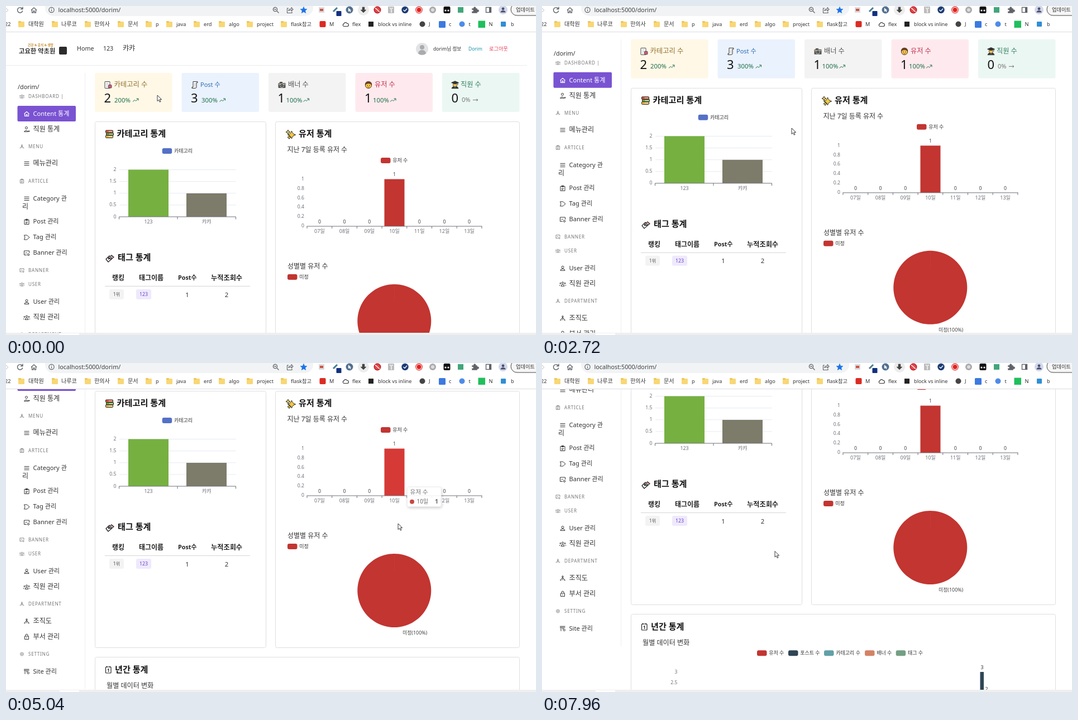
Write an HTML page that moves like this. It is 949 by 590 pixels and loops after 8 s.

```html
<!DOCTYPE html>
<html lang="ko">
<head>
<meta charset="utf-8">
<title>Dashboard</title>
<style>
html,body{margin:0;width:100%;height:100%;overflow:hidden;background:#fff}
svg{display:block;width:100%;height:100%}
text{font-family:'Noto Sans','Noto Sans CJK KR',sans-serif;white-space:pre}
</style>
</head>
<body>
<svg id="stage" viewBox="0 0 949 590"></svg>
<script>
const LOOP = 8000, STEP = 40;

// ---- drawing helpers (text y is the middle of the line)
const text = (x, y, s, size, fill = '#333', more = '') =>
  `<text x="${x}" y="${y + size * .36}" font-size="${size}" fill="${fill}" ${more}>${s}</text>`;
const mid = (x, y, s, size, fill, more = '') => text(x, y, s, size, fill, 'text-anchor="middle" ' + more);
const end = (x, y, s, size, fill) => text(x, y, s, size, fill, 'text-anchor="end"');
const rect = (x, y, w, h, fill, r = 0, more = '') =>
  `<rect x="${x}" y="${y}" width="${w}" height="${h}" rx="${r}" fill="${fill}" ${more}/>`;
const dot = (x, y, r, fill, more = '') => `<circle cx="${x}" cy="${y}" r="${r}" fill="${fill}" ${more}/>`;
const path = (d, stroke = '#333', w = 1, fill = 'none') =>
  `<path d="${d}" stroke="${stroke}" stroke-width="${w}" fill="${fill}" stroke-linejoin="round"/>`;
const at = (x, y, s, more = '') => `<g transform="translate(${x} ${y})" ${more}>${s}</g>`;
const bold = 'font-weight="700"';

// ---- browser bar
function browser() {
  const grey = '#5f6368';
  let s = rect(0, 0, 949, 47, '#fff') + rect(70, -12, 480, 30, '#f1f3f4', 15);
  s += path('M0 4L4 7.5 0 11', '#bbb');
  s += path('M29 4.5a4.7 4.7 0 1 0 .8 4M30 1.5V5.5H26', grey, 1.4);
  s += path('M45 7.5L50 3 55 7.5M46.5 6.5V12H49V9H51V12H53.5V6.5', grey, 1.3);
  s += dot(81.5, 7, 4.6, 'none', `stroke="${grey}" stroke-width="1.2"`) + path('M81.5 6.5V9.5M81.5 4.2V5.2', grey, 1.2);
  s += text(93.5, 7, 'localhost:5000/dorim/', 10.8, '#3c4043');
  s += dot(482, 6, 3.6, 'none', `stroke="${grey}" stroke-width="1.3"`) + path('M485 9L488.5 12.5M480.3 6H483.7', grey, 1.3);
  s += path('M506 4H503.5V12.5H512V10M506 9C506 6 508 5 511 5V2.5L514 6 511 9V7C509 7 507 7.5 506 9', grey, 1.1);
  s += path('M533 1.2L534.7 5.2 539 5.6 535.8 8.5 536.8 12.8 533 10.5 529.2 12.8 530.2 8.5 527 5.6 531.3 5.2Z', '#1a73e8', .5, '#1a73e8');
  // extensions
  s += rect(560, 2, 10, 10, '#d9dadd', 1) + rect(562, 5, 6, 4, '#d0523f');
  s += path('M586 10L593 3', '#4c7d92', 3) + rect(591.5, 9, 9, 9, '#12307f', 1);
  s += dot(615, 7, 6.5, '#53708f') + path('M613 3.5V10L615 8.5 616.5 11 617.4 10.3 616 8H618Z', '#fff', .3, '#fff');
  s += dot(640, 7, 10, '#ececec') + path('M638 2H642V7H645L640 12 635 7H638Z', '#444', .5, '#444');
  s += dot(665, 7, 5.7, '#e04848', 'stroke="#c21f2b" stroke-width="1.6"') + path('M661 3.5L669 10.5', '#fff', 1.3);
  s += rect(684, 1, 11, 12, '#bcbcbc', 1) + path('M687 3L690 6V12M690 4H693', '#f4f4f4', 1.6);
  s += dot(714.5, 7, 6.2, '#1c3c73') + path('M711.5 7L714 9.3 718 4.8', '#fff', 1.4);
  s += dot(739.5, 7, 5.8, '#fff', 'stroke="#d9302c" stroke-width="1.2"') + dot(739.5, 7, 4, '#e3211d');
  s += dot(764, 7, 6, '#aaa') + dot(764, 7, 3, '#ddd');
  s += rect(783.5, 1, 12, 12, '#111', 2) + dot(787, 8, 1.6, '#fff') + dot(792, 8, 1.6, '#fff');
  s += rect(809, 2, 10, 10, '#41a67a');
  s += path('M834.5 4.5H837.5a2 2 0 1 1 3.6 0H843.5V7a2 2 0 1 1 0 3.2V12.5H834.5V9.5a1.6 1.6 0 1 0 0-2.5Z', grey, .5, grey);
  s += rect(859.5, 2.5, 9, 9, 'none', 0, `stroke="${grey}" stroke-width="1.4"`) + rect(865, 2, 4, 10, grey);
  s += dot(890, 7, 8, '#d3d7ea') + dot(890, 5, 2.4, '#4b5170') + path('M885.5 11.5a4.5 3.6 0 0 1 9 0Z', 'none', 0, '#4b5170');
  s += rect(904, -5, 70, 22, '#f6f6f6', 11, 'stroke="#444" stroke-width="1"') + text(913, 7, '업데이트', 9.2);
  // bookmarks
  const y = 32.5;
  s += end(8.5, y, '22', 9.2);
  [[22, 40, '대학원'], [82, 99, '나루코'], [141, 158, '한의사'], [200, 218, '문서'], [250, 268, 'p'], [287, 305, 'java'],
   [336, 354, 'erd'], [381, 399, 'algo'], [431, 449, 'project'], [492, 510, 'flask참고']].forEach(([fx, x, name]) => {
    s += rect(fx, 28, 11, 10, '#f8d775', 1.2) + rect(fx, 27, 5, 3, '#eec65a', 1) + text(x, y, name, /^[가-힣]/.test(name) ? 10.1 : 9.2);
  });
  [[579, 'M'], [620, 'flex'], [666, 'block vs inline'], [757, 'J'], [793, 'c'], [828.5, 't'], [864.5, 'N'], [904, 'b']]
    .forEach(([x, name]) => s += text(x, y, name, 9.2));
  s += rect(561.5, 27, 11, 11, '#dd2b22', 2) + rect(649, 28, 9, 9, '#222') + dot(745.5, 32.5, 5, '#444');
  s += path('M605 36.5a2.4 2.4 0 0 1 0-4.6 3 3 0 0 1 5.6-.6 2.6 2.6 0 0 1 .4 5.2Z', '#333', 1.1);
  s += rect(775, 27, 12, 12, '#3b7ae0', 1.5) + dot(816.5, 32.5, 5, '#4f8bea') + rect(845.5, 26.5, 12.5, 12.5, '#1fbf5c') + rect(886, 28, 9, 9, '#2f8fd6', 1);
  return s + rect(0, 46, 949, 1, '#dadce0');
}

// ---- page header and sidebar
function header() {
  return text(39, 70, '건강 &amp; 휴식 &amp; 생활', 5.7, '#c98a2b', bold) +
    text(23, 80.5, '고요한 약초원', 11.3, '#333', bold) + rect(95, 73, 14, 14, '#2b2b2b', 2) +
    text(127, 76.5, 'Home', 10.7) + text(174, 76.5, '123', 10.6) + text(209, 76, '캬캬', 12) +
    dot(745, 77, 11, '#e1e3e5') + dot(745, 74, 4, '#a9abad') + path('M738 85.3a7 6.6 0 0 1 14 0 11 11 0 0 1-14 0Z', 'none', 0, '#a9abad') +
    text(765, 77, 'dorim님 정보', 8.6) + text(828, 77, 'Dorim', 8.5, '#1793a6') + text(865, 76.5, '로그아웃', 9.2, '#e8415a') +
    rect(0, 106, 933, 1, '#ebebeb');
}

const ICON = {
  home: 'M-4.5 0L0-4 4.5 0M-3.5-.8V4H3.5V-.8M-1 4V1H1V4',
  lines: 'M-4.5-3H4.5M-4.5 0H4.5M-4.5 3H4.5',
  note: 'M-4-3.5H4V4.5H-4ZM-1.5-4.8H1.5V-2.5H-1.5ZM-2 .5H2M-2 2.5H1',
  tag: 'M-4.5-4H0.5L5 0 .5 4H-4.5L-3 0Z',
  image: 'M4.5 0V-4H-4.5V3.5H0M-2.5 1L-.5-1 1 .5M1.5 3a1.6 1.6 0 1 0 3.2 0 1.6 1.6 0 1 0-3.2 0',
  user: 'M-2-2a2 2 0 1 0 4 0 2 2 0 1 0-4 0M-4 4a4 3 0 0 1 8 0Z',
  users: 'M-1.5-2a1.5 1.5 0 1 0 3 0 1.5 1.5 0 1 0-3 0M-3 4a3 3 0 0 1 6 0ZM-5-1a1 1 0 1 0 2 0 1 1 0 1 0-2 0M3-1a1 1 0 1 0 2 0 1 1 0 1 0-2 0M-5.5 3.5V2M5.5 3.5V2',
  tree: 'M-1.2-3a1.2 1.2 0 1 0 2.4 0 1.2 1.2 0 1 0-2.4 0M0-1.8L-3.5 3M0-1.8L3.5 3M-4.8 3.5H-2.4M2.4 3.5H4.8M0-1V3.5',
  lock: 'M-3.5-1H3.5V4.5H-3.5ZM-2-1V-2.8a2 2 0 0 1 4 0V-1M0 1V2.6',
  site: 'M-5-4H4.5M-5-2H4.5M-3-1.5V4.5M-1 0H2M1 2.5a1.7 1.7 0 1 0 3.4 0 1.7 1.7 0 1 0-3.4 0',
  staff: 'M-2.5-2.5a2 2 0 1 0 4 0 2 2 0 1 0-4 0M-4.5 4.5a4 4.5 0 0 1 7 0ZM2.5 3.5H5.5M4 2V5',
  gear: 'M-1.2 0a1.2 1.2 0 1 0 2.4 0 1.2 1.2 0 1 0-2.4 0M0-4L3.4-2V2L0 4-3.4 2V-2Z'
};

function sidebar() {
  const icon = (x, y, name, color = '#333', w = 1, scale = 1) =>
    at(x, y, at(0, 0, path(ICON[name], color, w)).replace('translate(0 0)', `scale(${scale})`));
  let s = rect(141, 120, 1, 622, '#efefef') + text(21, 145, '/dorim/', 10.8);
  [[162, 'DASHBOARD |', 'users'], [252, 'MENU', 'tree'], [314, 'ARTICLE', 'note'], [474, 'BANNER', 'image'],
   [499, 'USER', 'users'], [589, 'DEPARTMENT', 'tree'], [679, 'SETTING', 'gear']].forEach(([y, name, ic]) => {
    s += icon(28.5, y, ic, '#777', 1.1, .78) + text(40, y, name, 8.1, '#777', 'letter-spacing=".75"');
  });
  s += rect(20.5, 179, 104.5, 28, '#7953d2', 2) + icon(37, 193.5, 'home', '#fff', 1.1) + text(48.5, 193, 'Content 통계', 11.1, '#fff');
  [[220.5, '직원 통계', 'staff'], [282, '메뉴관리', 'lines'], [345, 'Category 관', 'lines'], [386.5, 'Post 관리', 'note'],
   [414.5, 'Tag 관리', 'tag'], [442.5, 'Banner 관리', 'image'], [530, 'User 관리', 'user'], [558, '직원 관리', 'users'],
   [619.5, '조직도', 'tree'], [647.5, '부서 관리', 'lock'], [709.8, 'Site 관리', 'site']].forEach(([y, name, ic]) => {
    s += icon(37, y + .5, ic) + text(48.5, y, name, /^[A-Z]/.test(name) ? 11.1 : 12.1);
  });
  return s + text(29, 359.5, '리', 12);
}

// ---- summary cards
const emoji = {
  tabs: rect(-5.5, -6, 9, 12, '#fff', .5, 'stroke="#444" stroke-width="1"') + path('M-3-3H1M-3 0H1M-3 3H0', '#999', .8) + rect(1, 0, 5.5, 5.5, '#d9587d', 1, 'stroke="#333" stroke-width=".8"'),
  scroll: path('M-3-6H5V-4H3V4.5Q3 6-1 6H-5V4H-3Z', '#333', 1, '#fff') + path('M-1-2.5H1.5M-1 0H1.5M-1 2.5H1.5', '#888', .7),
  camera: rect(-6.5, -3.5, 13, 9, '#555', 1.2) + rect(-4, -5.5, 5, 3, '#555') + rect(-5.8, -2.5, 11.6, 2, '#c9a36a') + dot(0, 1.2, 3.2, '#222', 'stroke="#ddd" stroke-width="1"') + dot(0, 1.2, 1.2, '#6cb4d8'),
  face: dot(0, .5, 5.6, '#fbc94d', 'stroke="#4a3420" stroke-width="1"') + path('M-5.8 0Q-6-6 0-6.3 6-6 5.8 0 4-2.5 0-2.8-4-2.5-5.8 0Z', '#3b2416', .6, '#6b3f1f') + dot(-2, 1, .8, '#333') + dot(2, 1, .8, '#333') + path('M-2 3.4Q0 4.8 2 3.4', '#7a3d1c', .8),
  student: path('M-6 6.5Q-5.5 2.5 0 2.5 5.5 2.5 6 6.5Z', '#222', .5, '#333') + dot(0, 0, 3.6, '#f5c14d', 'stroke="#332" stroke-width=".8"') + path('M-6.5-4L0-6.8 6.5-4 0-1.6ZM5-4V0', '#222', .8, '#333') + path('M-1 3.5L0 6 1 3.5Z', 'none', 0, '#3b8bc4')
};
const CARDS = [
  { x: 159, bg: '#fff8e7', ink: '#94702c', icon: 'tabs', name: '카테고리 수', n: 2, pct: '200%', px: 35, ix: 68, sel: [193, 63], size: 12.3, nx: 193.5 },
  { x: 314.5, bg: '#eaf2fd', ink: '#2c6cb3', icon: 'scroll', name: 'Post 수', n: 3, pct: '300%', px: 35.5, ix: 68, sel: [332, 54.5], size: 11, nx: 348 },
  { x: 470, bg: '#f3f3f3', ink: '#555', icon: 'camera', name: '배너 수', n: 1, pct: '100%', px: 31.5, ix: 62.5, sel: [487, 58], size: 12.2, nx: 505 },
  { x: 625.5, bg: '#feeaee', ink: '#c4304f', icon: 'face', name: '유저 수', n: 1, pct: '100%', px: 31.5, ix: 62.5, sel: [642, 58], size: 12.2, nx: 660 },
  { x: 781, bg: '#ebf7f3', ink: '#33805f', icon: 'student', name: '직원 수', n: 0, pct: '0%', px: 35, ix: 55, sel: [798, 53], size: 12.2, nx: 814 }
];
const inkOf = (c, part) => part === 'name' ? c.ink : part === 'num' ? '#111' : c.n ? '#1d6e49' : '#777';

function cards() {
  return CARDS.map((c, i) => {
    const mark = (part, x, y, w, h) => rect(x, y, w, h, '#3390ff', 0, `id="${part}Mark${i}" visibility="hidden"`);
    const pctEnd = c.x + c.ix - 2;
    return rect(c.x, 120, 138.5, 70, c.bg, 3) +
      mark('name', c.sel[0], 133, c.sel[1], 16) + mark('num', c.x + 17, 150.5, c.px - 20, 27.5) +
      mark('pct', c.x + c.px - 3, 150.5, pctEnd - c.x - c.px + 3, 27.5) +
      at(c.x + (i === 4 ? 23 : i === 2 ? 24 : 23.5), 141.5, emoji[c.icon]) +
      text(c.nx, 141, c.name, c.size, c.ink, `id="name${i}"`) +
      text(c.x + 16.5, 165, c.n, 22, '#111', `id="num${i}"`) +
      text(c.x + c.px, 168.5, c.pct, c.n ? 11.3 : 11, inkOf(c, 'pct'), `id="pct${i}"`) +
      at(c.x + c.ix, 168.5, c.n ? path('M0 3L3.5 0 5.5 2 9.5-2M6.5-2.5H10V1', '#1d6e49', 1) : path('M0 0H9M6.5-2L9 0 6.5 2', '#777', 1));
  }).join('');
}

// ---- panels and charts
const swatch = (x, y, color, name, more = '') => rect(x, y - 5, 17.5, 10, color, 3, more) + text(x + 21.2, y - .5, name, 9);
const panel = (x, y, w, h) => rect(x, y, w, h, '#fff', 3, 'stroke="#dedede"');
const AX = '#6e7079';

function leftPanel() {
  let s = panel(159.5, 207.5, 306, 460);
  s += at(185.5, 230, rect(-7, -7, 13, 4.5, '#d8533c', 1, 'stroke="#222"') + rect(-6, -2.5, 13, 4.5, '#5e9e42', 1, 'stroke="#222"') + rect(-7, 2, 13, 4.5, '#e9b44a', 1, 'stroke="#222"') + path('M-2-5H5M-1-.2H6M-2 4.2H5', '#fff', 1));
  s += text(198.5, 229, '카테고리 통계', 15.2, '#111', bold) + swatch(279.7, 260, '#5470c6', '카테고리');
  for (let i = 0; i < 5; i++) {
    const y = 378 - i * 21.1;
    if (i) s += rect(203, y - .5, 209, 1, '#e6eaf2');
    s += end(197.5, y - .5, i / 2, 8.6, AX);
  }
  s += rect(219, 293.5, 72, 84.5, '#76b041', 0, 'id="bar0"') + rect(323, 336, 72, 42, '#7d7b6a', 0, 'id="bar1"');
  s += path('M202.5 382.5V378H411.5V382.5M307 378V382.5', AX) + mid(255, 386.5, '123', 8.8, AX) + mid(359, 386.5, '캬캬', 9, AX);
  // tag table
  s += at(186, 452, path('M-3 0L3-5 7-1.5 2 2ZM-7 2L-1-4 4 1-3 7Z', '#222', 1.3, '#fff') + path('M-3 2L1 0', '#222', 1.5) + dot(4, -3, 1.2, '#c33'), '');
  s += text(200, 451, '태그 통계', 15.1, '#111', bold);
  [[190, '랭킹', 12], [238, '태그이름', 12], [308, 'Post수', 10.8], [367, '누적조회수', 12.2]].forEach(([x, n, z]) => s += text(x, 487.5, n, z, '#222', bold));
  s += rect(177, 502, 260, 1, '#d5d5d5') + rect(185, 508, 26, 18, '#f3f3f3', 3) + rect(233, 508, 27, 18, '#efe9fd', 3);
  return s + mid(198, 517, '1위', 8.4, '#555') + mid(246.5, 517, '123', 8.8, '#6944c6') + mid(324.5, 517.5, '1', 11.3) + mid(395, 517.5, '2', 11.3);
}

function rightPanel() {
  let s = panel(482.5, 207.5, 437, 460);
  const star = (x, y, r) => path(`M${x} ${y - r}Q${x + r * .2} ${y - r * .2} ${x + r} ${y} ${x + r * .2} ${y + r * .2} ${x} ${y + r} ${x - r * .2} ${y + r * .2} ${x - r} ${y} ${x - r * .2} ${y - r * .2} ${x} ${y - r}Z`, '#222', 1, '#f6c83b');
  s += star(511.5, 231, 7) + star(505, 226, 3.8) + star(507, 235.5, 3);
  s += text(524, 229, '유저 통계', 15.1, '#111', bold) + text(503.5, 258, '지난 7일 등록 유저 수', 12) + swatch(671, 277, '#c23531', '유저 수');
  for (let i = 0; i < 6; i++) s += end(534, 394 - i * 16.85, i ? (i / 5).toString() : '0', 8.6, AX);
  s += rect(677.5, 310.5, 36, 84.5, '#c23531', 0, 'id="bar2"');
  for (let i = 0; i < 7; i++) {
    const x = 561.4 + i * 44.7;
    s += mid(x, 404, String(7 + i).padStart(2, '0') + '일', 9, AX) + mid(x, i === 3 ? 302 : 386.5, i === 3 ? 1 : 0, 8.8, '#444');
  }
  for (let i = 0; i < 8; i++) s += path(`M${539 + i * 44.7} 395V399`, AX);
  s += path('M538.5 395H852.5', AX) + text(504, 467, '성별별 유저 수', 12) + swatch(504, 486, '#c23531', '미정', 'id="pieKey"');
  return s + '<path id="pie" fill="#c23531"/>' + text(710, 640.5, '미정(100%)', 8.9, '#444', 'id="pieLabel"');
}

function yearPanel() {
  let s = panel(159.5, 684.5, 760, 320);
  s += rect(178.5, 702, 9.5, 11, '#fff', 1, 'stroke="#222" stroke-width="1.2"') + path('M180.5 700.5V703M186 700.5V703', '#222', 1.2) + mid(183.3, 707.8, '1', 8, '#222', bold);
  s += text(195, 706.5, '년간 통계', 15.1, '#111', bold) + text(180, 735.3, '월별 데이터 변화', 12.1);
  [[385, '#c23531', '유저 수'], [441, '#2f4554', '포스트 수'], [505, '#61a0a8', '카테고리 수'], [578, '#d48265', '배너 수'], [633.7, '#749f83', '태그 수']]
    .forEach(([x, c, n]) => s += swatch(x, 754.3, c, n));
  s += end(242.5, 787.5, '3', 8.6, AX) + end(242.5, 807, '2.5', 8.6, AX);
  return s + rect(784.5, 788, 6.5, 120, '#2f4554') + mid(788, 779.5, '3', 8.8, '#333') + mid(796, 818.5, '2', 8.8, '#333');
}

const tip = (id, w, h, pad, edge, title, color, name, value) =>
  `<g id="${id}" filter="url(#soft)">` + rect(0, 0, w, h, '#fff', 3, `stroke="${edge}"`) +
  text(pad, h / 2 - 8.5, title, 10.6, '#666') + dot(pad + 3.5, h / 2 + 8.8, 4, color) +
  text(pad + 12, h / 2 + 8.5, name, 10, '#666') + text(w - pad - 6, h / 2 + 8.5, value, 10.4, '#555', bold) + '</g>';

const stage = document.getElementById('stage');
stage.innerHTML =
  '<defs><clipPath id="view"><rect y="46" width="949" height="540"/></clipPath>' +
  '<filter id="soft" x="-20%" y="-20%" width="140%" height="150%"><feDropShadow dx="1" dy="2" stdDeviation="2.5" flood-opacity=".22"/></filter></defs>' +
  rect(0, 0, 949, 590, '#fff') +
  '<g clip-path="url(#view)"><g id="page">' + header() + sidebar() + cards() + leftPanel() + rightPanel() + yearPanel() +
  tip('tip0', 63.5, 41, 8, '#8fbf63', '카테고리', '#76b041', '123', 2) +
  tip('tip1', 63.5, 41, 8, '#98968a', '카테고리', '#7d7b6a', '캬캬', 1) +
  tip('tip2', 60.5, 35, 5, '#eee', '유저 수', '#c23531', '10일', 1) + '</g></g>' +
  browser() + rect(0, 586, 949, 4, '#efefef') + rect(96, 587, 35, 3, '#fff') +
  dot(0, 0, 9, '#f7dc1e', 'id="press" opacity=".65"') +
  '<g id="arrow">' + path('M0 0V10.6L2.5 8.3 4.2 12.2 6 11.4 4.3 7.6H7.6Z', '#222', .9, '#fff') + '</g>' +
  '<g id="hand">' + path('M-1.2 1Q0-.6 1.2 1V5Q2.4 4 3.2 5.2 4.4 4.4 5.2 5.6 6.6 5.2 6.8 6.8V10L5.5 13.5H-1L-4 8.5Q-4 6.8-1.2 8.5Z', '#222', .9, '#fff') + '</g>';

// ---- motion
const el = id => document.getElementById(id);
const clamp = v => Math.max(0, Math.min(1, v));
const ramp = (t, a, b) => clamp((t - a) / (b - a));
const smooth = p => p * p * (3 - 2 * p);
const cubicInOut = p => p < .5 ? 4 * p ** 3 : 1 - 4 * (1 - p) ** 3;
const within = (t, a, b) => t >= a && t < b;
const fade = (t, a, b) => ramp(t, a, a + 120) * (1 - ramp(t, b, b + 160));

// time, x, y
const TRACK = [
  [0, 271, 160], [280, 271, 160], [520, 193, 134], [600, 202, 142], [1040, 688, 178], [1240, 793, 179], [1280, 793, 179],
  [1600, 845, 181], [1840, 845, 181], [2560, 447, 219], [2800, 447, 219], [3520, 222, 250], [3840, 306, 279],
  [4100, 360, 285], [4360, 648, 330], [4640, 660, 300], [4840, 698, 202], [5040, 702, 288], [5300, 702, 296],
  [5600, 690, 330], [6080, 533, 254], [6960, 533, 254], [7040, 520, 264], [7400, 33, 315], [7520, 33, 315],
  [7840, 268, 330], [7960, 417, 337.5]
];
function pointer(t) {
  const i = TRACK.findIndex(k => k[0] > t);
  if (i < 0) return TRACK[TRACK.length - 1].slice(1);
  const [a, b] = [TRACK[i - 1], TRACK[i]], p = ramp(t, a[0], b[0]);
  return [1, 2].map(j => a[j] + (b[j] - a[j]) * p);
}
const scrollAt = t => 78 * smooth(ramp(t, 2600, 2774)) + 79 * smooth(ramp(t, 4440, 4640)) + 77 * smooth(ramp(t, 5060, 5240));

function select(t, x) {
  const on = within(t, 560, 1840);
  CARDS.forEach((c, i) => {
    const picked = { name: x > c.x, num: x > c.x + 25, pct: x > c.x + 50 };
    for (const part in picked) {
      const hit = on && picked[part];
      el(part + 'Mark' + i).setAttribute('visibility', hit ? 'visible' : 'hidden');
      el(part + i).setAttribute('fill', hit ? '#fff' : inkOf(c, part));
    }
  });
}

function drawPie(t) {
  const cx = 695.3, cy = 565, off = within(t, 6160, 6340), grow = t >= 6340;
  const open = grow ? cubicInOut(ramp(t, 6340, 7340)) : 1;
  const hover = ramp(t, 5240, 5400) * (1 - ramp(t, 5840, 6000));
  const r = grow ? 67.4 - 1.4 * ramp(t, 7340, 7500) : 66 + 4 * hover;
  const a = Math.min(open, .9999) * 2 * Math.PI;
  el('pie').setAttribute('d', `M${cx} ${cy}V${cy - r}A${r} ${r} 0 ${a > Math.PI ? 1 : 0} 1 ${cx + r * Math.sin(a)} ${cy - r * Math.cos(a)}Z`);
  el('pie').setAttribute('fill', hover > .5 ? '#d53a36' : '#c23531');
  const gone = 1 - ramp(t, 6160, 6260);
  el('pie').setAttribute('opacity', off ? gone : 1);
  el('pieLabel').setAttribute('opacity', off ? gone : open);
  el('pieKey').setAttribute('fill', off ? '#ccc' : '#c23531');
}

function place(id, x, y, opacity) {
  const g = el(id);
  g.setAttribute('transform', `translate(${x} ${y})`);
  g.setAttribute('opacity', opacity);
}

function render(t) {
  const [x, y] = pointer(t), scroll = scrollAt(t);
  el('page').setAttribute('transform', `translate(0 ${-scroll})`);
  select(t, x);
  drawPie(t);

  el('bar0').setAttribute('fill', within(t, 3280, 3920) ? '#82c148' : '#76b041');
  el('bar1').setAttribute('fill', within(t, 3920, 4160) ? '#8a8875' : '#7d7b6a');
  el('bar2').setAttribute('fill', within(t, 4760, 5080) ? '#d53a36' : '#c23531');
  const [lx, ly] = pointer(t - 200 < 0 ? 0 : t - 200);
  place('tip0', lx + 20, ly + 20 + 78, fade(t, 3280, 3860));
  place('tip1', Math.min(lx, 360) + 20, Math.min(ly, 285) + 20 + 78, fade(t, 3960, 4140));
  place('tip2', 718.5, 379.5, .9 * fade(t, 4800, 5040));

  const hand = within(t, 6040, 6980);
  place('press', x, y, within(t, 520, 1840) ? .65 : 0);
  place('arrow', x, y, hand ? 0 : 1);
  place('hand', x, y, hand ? 1 : 0);
}

function tick(now) {
  render(Math.floor((now % LOOP) / STEP) * STEP);
  requestAnimationFrame(tick);
}
requestAnimationFrame(tick);
</script>
</body>
</html>
```
